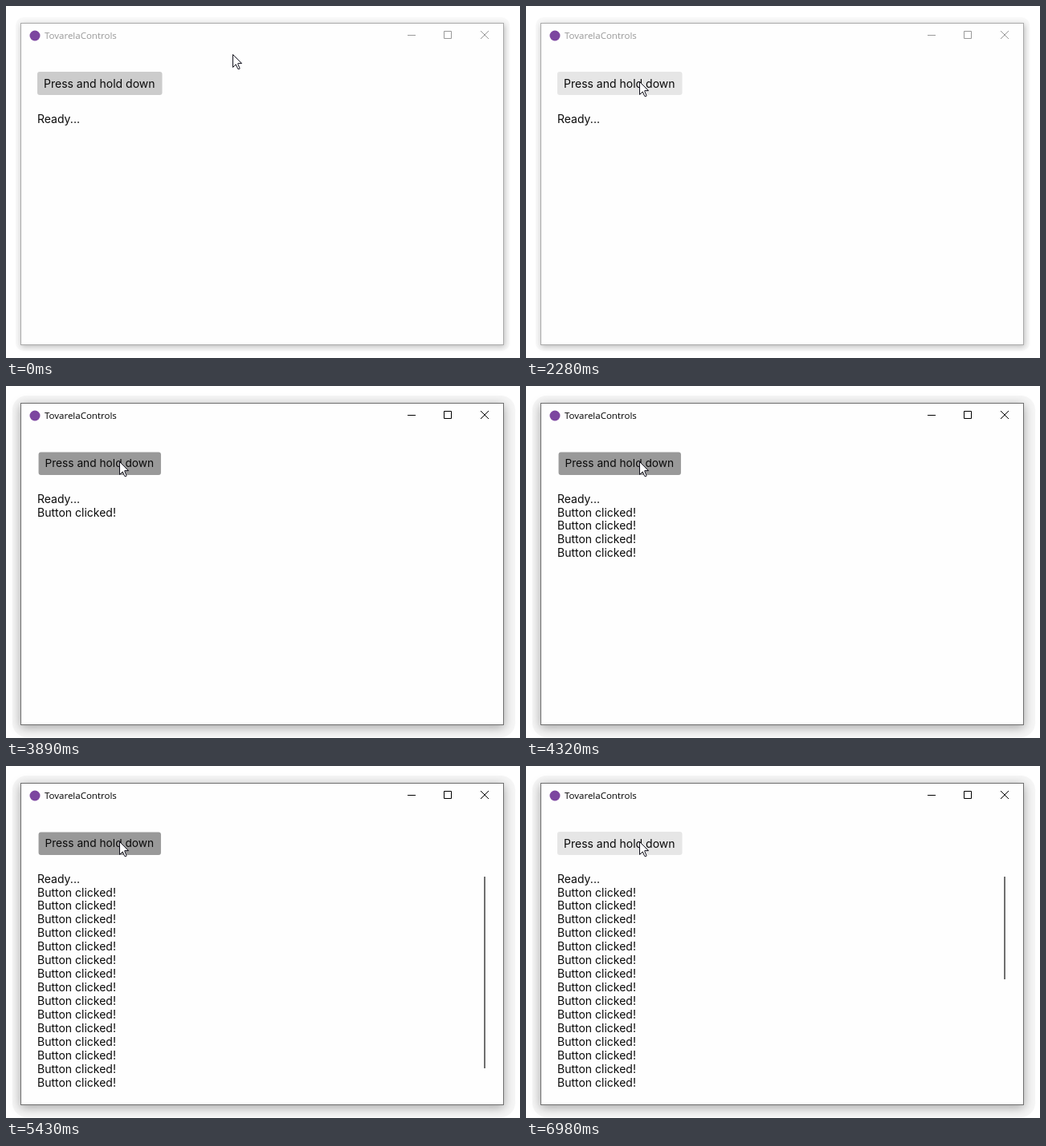
Animation of 640 by 439 pixels, one loop 8000 ms. Source, as an HTML page:

```html
<!DOCTYPE html>
<html lang="en">
<head>
<meta charset="utf-8">
<title>Repeat button</title>
<style>
  html, body { margin: 0; width: 100%; height: 100%; overflow: hidden; background: #fff; }
  #stage { position: relative; width: 640px; height: 439px; overflow: hidden; --ink: #999; }
  #stage.active { --ink: #000; }

  .halo { position: absolute; left: 12px; top: 14px; width: 615px; height: 416px;
          border-radius: 10px; background: #f9f9f9; }
  .active .halo { left: 8px; top: 12px; width: 626px; height: 426px;
                  border-radius: 18px; background: #f6f6f6; }
  .window { position: absolute; left: 18px; top: 21px; width: 600px; height: 400px;
            border: 1px solid #aaa; background: #fefefe;
            box-shadow: 1px 2px 7px rgba(0, 0, 0, .26); }
  .active .window { border-color: #6f6f6f; box-shadow: 0 3px 12px rgba(0, 0, 0, .34); }

  svg { position: absolute; left: 0; top: 0; display: block; }
  text { font: 14px Inter, sans-serif; fill: #0a0a0a; white-space: pre; }
  .title { font: 11.5px "Open Sans", "Noto Sans", sans-serif; fill: var(--ink); }
  .chrome { fill: none; stroke: var(--ink); }
</style>
</head>
<body>
<div id="stage">
  <div class="halo"></div>
  <div class="window"></div>
  <svg width="640" height="439" viewBox="0 0 640 439">
    <circle cx="36" cy="37" r="6.5" fill="#7c46a0"/>
    <text class="title" x="48" y="41">TovarelaControls</text>
    <g class="chrome">
      <path d="M500 36.5h10"/>
      <path d="M545.5 31.5h9v9h-9z"/>
      <path d="M591 31l10 10M601 31l-10 10"/>
    </g>
    <g id="button">
      <rect id="face" x="39" y="82" width="155.5" height="29" rx="3"/>
      <text id="label" x="47" y="102">Press and hold down</text>
    </g>
    <g id="log"></g>
    <rect id="thumb" x="595" y="138" width="2" fill="#707070"/>
    <path id="cursor" fill="#fff" stroke="#10101c" stroke-width="1"
          d="M.5.5V16.5L4.2 12.9 6.8 18.5H8.8L9 17.6 6.8 12.5V11.6H11.5Z"/>
  </svg>
</div>
<script>
const LOOP = 8000, HOVER = 1990, PRESS = 3520, RELEASE = 6980;
const VISIBLE_LINES = 16;

// Runs of clicks: first time, last time, count
const CLICKS = [
  [3890, 3960, 2], [4140, 4715, 7], [4810, 4940, 2], [5050, 5250, 3],
  [5430, 5490, 2], [5590, 6220, 7], [6330, 6890, 7]
];

const $ = id => document.getElementById(id);
const stage = $('stage'), button = $('button'), face = $('face'), label = $('label');
const thumb = $('thumb'), cursor = $('cursor');

const lines = Array.from({ length: VISIBLE_LINES }, (_, i) => {
  const line = document.createElementNS('http://www.w3.org/2000/svg', 'text');
  line.setAttribute('x', 39);
  line.setAttribute('y', Math.round(140.6 + 16.94 * i) + 5);
  line.textContent = i ? 'Button clicked!' : 'Ready...';
  return $('log').appendChild(line);
});

// How many of n evenly spaced steps have happened by time t
function stepsDone(t, first, last, n) {
  if (t < first) return 0;
  return Math.min(n, 1 + Math.floor((t - first) / (last - first) * (n - 1)));
}

const mix = (a, b, p) => a.map((v, i) => Math.round(v + (b[i] - v) * p));

function cursorAt(t) {
  const start = [282, 60], bend = [225, 68], edge = [159, 82], rest = [141, 94];
  if (t < 930) return start;
  if (t < 1180) return [283, 60];
  if (t < 1550) return mix(start, bend, stepsDone(t, 1180, 1480, 6) / 6);
  if (t < HOVER) return mix(bend, edge, stepsDone(t, 1550, 1920, 7) / 7);
  const p = stepsDone(t, HOVER, 2280, 6) / 6;
  return mix(edge, rest, 1 - (1 - p) ** 1.6);
}

function drawButton(t) {
  const pressed = t >= PRESS && t < RELEASE;
  const scale = !pressed ? 1 : t < PRESS + 60 ? .99 : .98;
  face.setAttribute('fill', pressed ? '#999' : t >= HOVER ? '#e6e6e6' : '#ccc');
  label.setAttribute('y', pressed ? 101 : 102);
  button.setAttribute('transform',
    pressed ? `translate(116.75 97) scale(${scale}) translate(-116.75 -96.7)` : '');
}

function drawLog(t) {
  const count = 1 + CLICKS.reduce((sum, run) => sum + stepsDone(t, ...run), 0);
  lines.forEach((line, i) => line.setAttribute('visibility', i < count ? 'visible' : 'hidden'));
  thumb.setAttribute('height', count < VISIBLE_LINES ? 0 : Math.round(4101 / (count + 1.16)));
}

function draw(now) {
  const t = Math.max(0, now) % LOOP;
  stage.classList.toggle('active', t >= PRESS);
  drawButton(t);
  drawLog(t);
  cursor.setAttribute('transform', `translate(${cursorAt(t)})`);
  requestAnimationFrame(draw);
}
draw(0);
</script>
</body>
</html>
```
